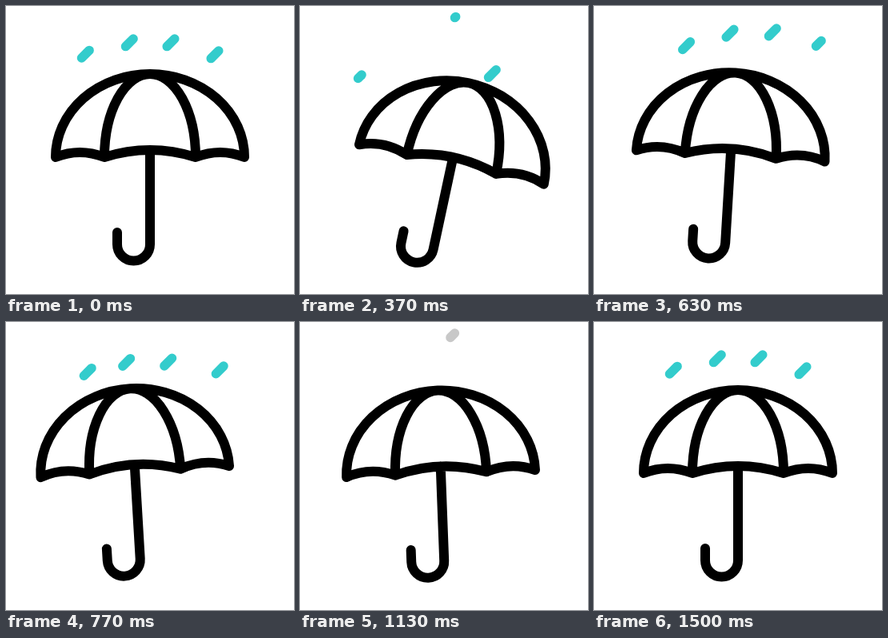
An HTML page with a canvas that plays this animation: 360x360 px, repeating every 1.67 s.

```html
<!DOCTYPE html>
<html lang="en">
<head>
<meta charset="utf-8">
<title>Umbrella in the rain</title>
<style>
  html, body { margin: 0; background: #fff; overflow: hidden; }
  canvas { display: block; }
</style>
</head>
<body>
<canvas id="stage" width="360" height="360"></canvas>
<script>
const ctx = document.getElementById('stage').getContext('2d');
const LOOP = 1670, MOVE = 1500, STEP = 100 / 3;
const TEAL = '#33cccc', GREY = '#c8c8c8';

// Umbrella sway: time, x offset, y offset, angle in degrees
const sway = [
  [0, 0, 0, 0], [170, 1.5, 5, 4.4], [370, 9.5, 9, 12.2], [433, 11.3, 9, 13],
  [630, -9, -1.5, 3.6], [780, -19, -1.8, -3.8], [930, -12, -0.5, -4.1],
  [1130, -4, 0.5, -2.2], [1500, 0, 0, 0]
];

// Resting centre, start and end of the fall, then the times of each pass:
// end of the first, start and end of the second, start of the third
const outer = { from: [24, -18], to: [-27, 31] };
const inner = { from: [40, -32], to: [-22, 20] };
const drops = [
  { x: 99.3, y: 60.2, path: outer, times: [385, 493, 986, 1180] },
  { x: 154.3, y: 45.8, path: inner, times: [340, 355, 875, 1050] },
  { x: 206, y: 45.8, path: inner, times: [340, 385, 870, 1140] },
  { x: 261, y: 60.8, path: outer, times: [419, 551, 986, 1220] }
];

const smooth = u => u * u * (3 - 2 * u);
const mix = (a, b, p) => a + (b - a) * p;

function slope(i, k) {
  if (i === 0 || i === sway.length - 1) return 0;
  const a = sway[i - 1], b = sway[i + 1];
  return (b[k] - a[k]) / (b[0] - a[0]);
}

// Cubic Hermite curve through one column of the sway keys
function swayAt(t, k) {
  let i = 0;
  while (i < sway.length - 2 && t >= sway[i + 1][0]) i++;
  const a = sway[i], b = sway[i + 1], span = b[0] - a[0];
  const u = (t - a[0]) / span, v = 1 - u;
  return mix(a[k], b[k], smooth(u)) +
    span * u * v * (v * slope(i, k) - u * slope(i + 1, k));
}

function drawUmbrella(t) {
  ctx.save();
  ctx.translate(180 + swayAt(t, 1), 189 + swayAt(t, 2));
  ctx.rotate(swayAt(t, 3) * Math.PI / 180);
  ctx.lineWidth = 12;
  ctx.strokeStyle = '#000';
  ctx.beginPath();
  ctx.ellipse(0, 0, 118, 104, 0, Math.PI, 0);
  ctx.quadraticCurveTo(88, -12, 57, 0);
  ctx.quadraticCurveTo(0, -18, -57, 0);
  ctx.quadraticCurveTo(-88, -12, -118, 0);
  ctx.moveTo(-57, 0);
  ctx.ellipse(0, 0, 57, 104, 0, Math.PI, 0);
  ctx.moveTo(0, -9);
  ctx.lineTo(0, 109);
  ctx.arc(-20.5, 109, 20.5, 0, Math.PI);
  ctx.lineTo(-41, 94);
  ctx.stroke();
  ctx.restore();
}

function drawDrop({ x, y, path, times }, t) {
  const [end1, start2, end2, start3] = times;
  let from = path.from, to = path.to, p, size, color = TEAL;
  if (t < end1) {
    from = [0, 0];
    p = (t / end1) ** 2;
    size = (1 - p) / 0.2;
  } else if (t >= start2 && t < end2) {
    p = ((t - start2) / (end2 - start2)) ** 1.5;
    size = Math.min(p / 0.14 + 0.1, (1 - p) / 0.15);
  } else if (t >= start3) {
    to = [0, 0];
    p = smooth((t - start3) / (MOVE - start3));
    size = p / 0.16;
    if (p < 0.12) color = GREY;
  } else return;

  const half = 4.8 * Math.min(1, size);
  const cx = x + mix(from[0], to[0], p), cy = y + mix(from[1], to[1], p);
  ctx.lineWidth = 11.5;
  ctx.strokeStyle = color;
  ctx.beginPath();
  ctx.moveTo(cx - half, cy + half);
  ctx.lineTo(cx + half, cy - half);
  ctx.stroke();
}

function draw(now) {
  // The motion advances at 30 steps per second and rests at the end
  const t = Math.min(MOVE, Math.floor((now % LOOP + 4) / STEP) * STEP);
  ctx.clearRect(0, 0, 360, 360);
  drawUmbrella(t);
  drops.forEach(drop => drawDrop(drop, t));
}

ctx.lineCap = ctx.lineJoin = 'round';
const begin = performance.now();
(function tick() {
  draw(performance.now() - begin);
  requestAnimationFrame(tick);
})();
</script>
</body>
</html>
```
